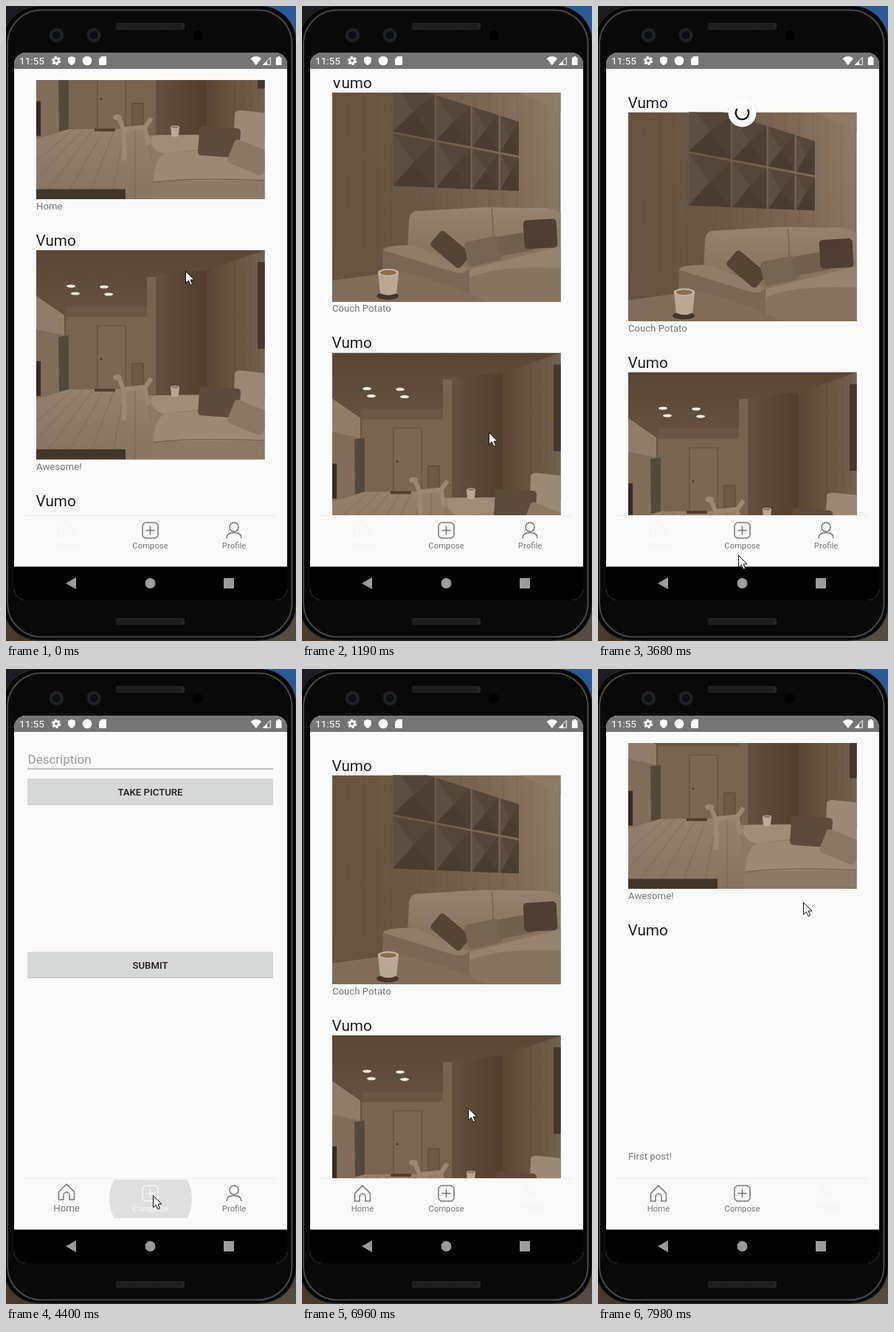
An HTML page for the animation above (8 s loop, 393 px wide and 858 px high).

```html
<!DOCTYPE html>
<html lang="en">
<head>
<meta charset="utf-8">
<title>Photo feed on a phone</title>
<style>
  html, body { margin: 0; width: 100%; height: 100%; overflow: hidden; background: #14161c; }
  svg { display: block; }
  text { font-family: Roboto, Arial, sans-serif; }
  .title { font-size: 20.7px; fill: #202020; }
  .caption { font-size: 13.2px; fill: #757575; }
  .button { font-size: 13.2px; font-weight: 500; fill: #1c1c1c; text-anchor: middle; }
  .label { text-anchor: middle; }
</style>
</head>
<body>
<svg id="stage" width="393" height="858" viewBox="0 0 393 858"></svg>
<script>
const LOOP = 8000;
const PITCH = 351.5, FIRST = 143.5, PHOTO_H = 282.5;
// Moments of the story, in ms.
const PULL = 2190, COMPOSE = 4240, PROFILE = 6040, BLANK = 6160, LOADED = 6290;

const poly = (points, fill, extra = '') => `<polygon points="${points}" fill="${fill}" ${extra}/>`;
const rect = (x, y, w, h, fill, extra = '') =>
  `<rect x="${x}" y="${y}" width="${w}" height="${h}" fill="${fill}" ${extra}/>`;
const path = (d, fill, extra = '') => `<path d="${d}" fill="${fill}" ${extra}/>`;
const line = (d, stroke, width = 1, extra = '') =>
  path(d, 'none', `stroke="${stroke}" stroke-width="${width}" ${extra}`);
const circle = (x, y, r, fill, extra = '') => `<circle cx="${x}" cy="${y}" r="${r}" fill="${fill}" ${extra}/>`;
const ellipse = (x, y, rx, ry, fill) => `<ellipse cx="${x}" cy="${y}" rx="${rx}" ry="${ry}" fill="${fill}"/>`;
const text = (x, y, cls, words, extra = '') => `<text x="${x}" y="${y}" class="${cls}" ${extra}>${words}</text>`;
const repeat = (n, make) => Array.from({ length: n }, (_, i) => make(i)).join('');
const gradient = (id, dir, ...colors) => `<linearGradient id="${id}" ${dir}>` +
  colors.map((c, i) => `<stop offset="${i / (colors.length - 1)}" stop-color="${c}"/>`).join('') + '</linearGradient>';

const pillow = (x, y, w, h, turn, fill) =>
  rect(-w / 2, -h / 2, w, h, fill, `rx="5" transform="translate(${x} ${y}) rotate(${turn})"`);
const cup = (x, y, size, coffee) => `<g transform="translate(${x} ${y}) scale(${size})">` +
  path('M-1 0H1L.8 2Q0 2.400-.8 2Z', '#b8a896') + ellipse(0, 0, 1, 0.35, '#c6b7a4') +
  ellipse(0, 0.03, 0.8, 0.24, coffee) + '</g>';

// Wall cushions in perspective: each one is a four-sided pyramid.
function wallPanels() {
  const top = x => -15 + (x - 82) * 0.318;
  const mid = x => 54 + (x - 82) * 0.19;
  const low = x => 126 + (x - 82) * 0.04;
  const edge = i => 82 + 64.5 * i - 5.3 * i * i;
  const panel = (l, r, hi, lo) => {
    const a = `${l},${hi(l)}`, b = `${r},${hi(r)}`, c = `${r},${lo(r)}`, d = `${l},${lo(l)}`;
    const m = `${(l + r) / 2},${(hi(l) + hi(r) + lo(l) + lo(r)) / 4}`;
    return poly([a, b, c, d], '#55463b') + poly([b, c, m], '#4e4036') +
      poly([c, d, m], '#4a3c33') + poly([d, a, m], '#5d4e43');
  };
  return repeat(4, i => {
    const l = edge(i), r = edge(i + 1) - 2.5;
    return panel(l, r, top, x => mid(x) - 1.5) + panel(l, r, x => mid(x) + 1.5, low);
  });
}

function couchPhoto() {
  return rect(0, 0, 310, 283, 'url(#wallA)') +
    repeat(17, i => line(`M${i * 19 + 4} 0V215`, '#4f3c2b', 0.8, 'opacity=".22"')) +
    poly('255,0 310,0 310,26', '#8d7a67') + wallPanels() +
    path('M101 240L104 172Q106 159 118 160L206 155L267 156Q300 154 310 164V240Z', 'url(#sofa)') +
    line('M216 157Q219 180 218 200', '#6b5848', 1) +
    path('M180 240L310 208V283H180Z', '#95826f') +
    path('M66 283L69 213Q70 206 112 206L186 238L187 283Z', '#7b6755') +
    path('M69 213Q70 206 112 206L186 238Q176 247 163 242Z', '#8f7c69') +
    path('M187 250Q220 234 310 237V283H187Z', '#87735f') +
    pillow(160, 212, 52, 27, 40, '#544436') + pillow(205, 214, 48, 33, -12, '#776553') +
    pillow(249, 204, 50, 26, -10, '#715f4f') + pillow(282, 191, 45, 39, -3, '#4e3e33') +
    path('M0 254L89 242Q150 253 210 283H0Z', '#806c59') +
    ellipse(75, 275, 15, 5, '#43362c') + cup(76, 243, 14, '#8f6d4b');
}

function roomPhoto() {
  return rect(0, 0, 310, 283, 'url(#ceiling)') +
    rect(40, 76, 115, 15, '#6a5644') + rect(40, 90, 115, 98, '#776451') +
    rect(83, 102, 38, 86, '#7b6754', 'stroke="#5c4938" stroke-width=".8"') +
    rect(130, 153, 15, 34, '#6d5a47', 'stroke="#544231" stroke-width=".8"') +
    circle(88, 147, 1.5, '#4a392a') +
    poly('0,201 42,188 160,187 160,283 0,283', 'url(#floor)') +
    repeat(8, i => line(`M${50 + i * 14} 188L${-58 + i * 32} 283`, '#665342', 0.7, 'opacity=".6"')) +
    // kitchen
    poly('0,62 38,88 38,190 0,201', '#7f6c59') + poly('0,62 38,88 38,115 0,107', '#907d69') +
    rect(0, 150, 6, 47, '#362c25') + poly('30,117 44,115 44,188 31,191', '#54473b') +
    rect(79, 187, 28, 4, '#51402f') + rect(0, 269, 121, 14, '#42352a') +
    // walls on the right
    rect(150, 36, 13, 160, '#77634f') + poly('162,34 231,27 231,197 162,197', 'url(#column)') +
    poly('231,27 310,0 310,200 231,197', 'url(#wallB)') +
    repeat(7, i => line(`M${236 + i * 11} ${24 - i * 3.6}V195`, '#503d2b', 0.8, 'opacity=".28"')) +
    rect(300, 16, 10, 117, '#43372e') +
    // sofa
    path('M266 240L269 166Q271 161 282 163L310 166V240Z', '#9b8976') +
    path('M155 203Q155 196 164 196L232 195L310 232V283H157Z', '#8c7966') +
    path('M155 203Q155 196 164 196H232V214L174 221Q158 218 155 203Z', '#9f8d79') +
    path('M159 258Q160 220 182 220L235 216L310 240V257Z', '#9b8975') +
    line('M158 260Q200 253 310 257', '#756250', 1.2) +
    pillow(248, 205, 56, 40, 4, '#5c4a3c') + pillow(288, 226, 52, 34, 22, '#8a7764') + cup(188, 185, 6, '#8a7663') +
    // dog
    ellipse(110, 172, 6, 4, '#9a8875') +
    line('M113 175L119 190V230M118 188L147 185L152 209M148 185L156 173', '#9a8875', 6, 'stroke-linejoin="round"') +
    repeat(4, i => ellipse(47 + 45 * (i % 2) + 6 * (i >> 1), 48.5 + 10 * (i >> 1) + i % 2, 6, 2.1, '#f6efe4'));
}

const posts = [['Couch Potato', 'couch'], ['Home', 'room'], ['Awesome!', 'room'], ['First post!', '']];
const card = ([caption, photo], i) => {
  const y = FIRST + i * PITCH;
  const picture = photo ? `<g transform="translate(41 ${y})" clip-path="url(#frame)"><use href="#${photo}"/></g>` : '';
  return text(40.5, y - 6, 'title', 'Vumo') + picture + text(41, y + 296.5, 'caption', caption);
};

const button = (y, words) => rect(29, y + 1, 333, 35, '#000', 'rx="2" opacity=".18"') +
  rect(29, y, 333, 34, '#d6d7d7', 'rx="2"') + text(195.5, y + 22.5, 'button', words);

const grille = y => rect(149, y, 93, 9, '#252525', 'rx="2"') +
  repeat(30, i => line(`M${151 + i * 3} ${y + 1}v7`, '#101010', 1));
const lens = x => circle(x, 39.5, 10, '#1b1e22') + circle(x, 39.5, 6.5, '#0c0e11', 'stroke="#30353c"');

const phone = rect(0, 0, 393, 858, '#1b1d22') + rect(340, 0, 53, 60, '#2c5a94') +
  rect(0, 800, 60, 58, '#4a3a2c') + rect(340, 800, 53, 58, '#544b41') +
  rect(-4, 0, 397, 857, '#050505', 'rx="48" stroke="#2c2c2c"') +
  rect(2, 5.5, 385.5, 847, '#090909', 'rx="46" stroke="#484848" stroke-width="2"') +
  grille(23) + grille(827) + lens(68.5) + lens(119) + circle(260, 40, 7, '#000');

const statusIcons = text(18, 79, '', '11:55', 'font-size="13.6" fill="#fff"') +
  circle(68, 74, 3.4, 'none', 'stroke="#fff" stroke-width="2.8"') +
  circle(68, 74, 5.3, 'none', 'stroke="#fff" stroke-width="2" stroke-dasharray="2.8 2.75"') +
  path('M89 68l5 2v4q-.5 4-5 6q-4.500-2-5-6v-4z', '#fff') + circle(110, 74, 6.3, '#fff') +
  path('M129.500 68h6.500v12h-10v-8.500z', '#fff') +
  path('M331.500 71Q339 65 346 71L338.800 80Z', '#fff') +
  line('M348.500 79.300L358.300 69.500V79.300Z', '#fff', 1) + poly('348,80 354,74 354,80', '#fff') +
  rect(365.8, 69.5, 7.6, 10.5, '#fff') + rect(368, 68, 3.2, 2, '#fff');

const navItems = [
  ['Home', '<path d="M-10.500 0L0-10.500L10.500 0V10.500H4V4.500A4 4 0 0 0-4 4.500V10.500H-10.500Z"/>'],
  ['Compose', '<rect x="-10.500" y="-10.500" width="21" height="21" rx="5"/><path d="M-6 0H6M0-6V6"/>'],
  ['Profile', '<circle cy="-4.500" r="6"/><path d="M-10 10.500Q-10 3 0 3Q10 3 10 10.500"/>']
];
const tabX = i => 82 + 113.5 * i;

document.getElementById('stage').innerHTML = `<defs>
  ${gradient('wallA', 'x2="1" y2="-.15"', '#66523f', '#6d5947', '#7b6754', '#927e6a')}
  ${gradient('wallB', 'x2="1"', '#5a4735', '#685441', '#75614e')}
  ${gradient('column', 'x2="1"', '#65513f', '#594636', '#533f2e')}
  ${gradient('ceiling', 'x2="0" y2="1"', '#594636', '#6b5745', '#7b6856')}
  ${gradient('sofa', 'x2="0" y2="1"', '#96836f', '#826e5b')}
  ${gradient('floor', 'x2="0" y2="1"', '#94816d', '#867360')}
  <clipPath id="screen"><rect x="11" y="63" width="370" height="740" rx="16"/></clipPath>
  <clipPath id="view"><rect x="11" y="100" width="370" height="589"/></clipPath>
  <clipPath id="frame"><rect width="309.500" height="${PHOTO_H}"/></clipPath>
  <clipPath id="tabs"><rect x="27" y="690" width="339" height="52"/></clipPath>
  <g id="couch">${couchPhoto()}</g><g id="room">${roomPhoto()}</g></defs>
  ${phone}
  <g clip-path="url(#screen)">
    ${rect(11, 63, 370, 740, '#fafafa') + rect(11, 63, 370, 22, '#757575') + statusIcons}
    <g clip-path="url(#view)"><g id="list">${posts.map(card).join('')}</g>
      <g id="spinner">${circle(0, 1, 20, '#000', 'opacity=".09"') + circle(0, 0, 19, '#fdfdfd')}
        <circle id="arc" r="8.700" fill="none" stroke="#111" stroke-width="2.300" pathLength="100"/></g></g>
    <g id="form">${text(29.5, 128, '', 'Description', 'font-size="17" fill="#9b9b9b"') +
      line('M29 135H362', '#868686', 1) + button(148, 'TAKE PICTURE') + button(382, 'SUBMIT')}</g>
    ${line('M27 688.500H366', '#ededed', 1)}
    <g clip-path="url(#tabs)"><circle id="ripple" cy="716" fill="#dfdfdf"/></g>
    ${navItems.map(([name, icon], i) =>
      `<g class="tab"><g fill="none" stroke-width="1.500" stroke-linejoin="round">${icon}</g>` +
      text(tabX(i), 733, 'label', name) + '</g>').join('')}
    ${rect(11, 757.5, 370, 46, '#000') + poly('81,780 95,772 95,788', '#9c9c9c') +
      circle(195.5, 780, 7, '#9c9c9c') + rect(295, 773, 14, 14, '#9c9c9c')}
  </g>
  <path id="cursor" d="M.5 .5V16.500L4.300 13L7 19L9.500 17.800L7 12H12Z" fill="#fff" stroke="#111"/>`;

const refresh = time => time < 150 ? 0 : 150 + Math.floor((time - 150) / 128.3) * 128.3;

// Turning points of the mouse: time, x, y.
const pointer = [[0, 243, 358], [670, 255, 385], [1310, 252, 626], [1820, 214, 359], [2090, 219, 403],
  [2460, 190, 652], [3250, 183, 767], [4060, 199, 711], [4540, 199, 711], [5030, 185, 232], [5540, 316, 712],
  [6160, 316, 712], [6540, 213, 473], [6950, 225, 593], [7465, 282, 501], [7976, 278, 315]];

function pointerAt(t) {
  const i = pointer.findIndex(k => k[0] > t);
  if (i < 0) return pointer[pointer.length - 1].slice(1);
  const [t0, x0, y0] = pointer[i - 1], [t1, x1, y1] = pointer[i];
  const f = (t - t0) / (t1 - t0);
  return [x0 + (x1 - x0) * f, y0 + (y1 - y0) * f];
}

const progress = (t, from, to) => Math.min(1, Math.max(0, (t - from) / (to - from)));
const fling = (f, power) => 1 - (1 - f) ** power;
const scrollAt = t => t < COMPOSE
  ? 516.5 * (1 - fling(progress(t, 0, 1310), 1.3))
  : 832 * fling(progress(t, 6950, 7976), 2.32);

const $ = id => document.getElementById(id);
const tabs = [...document.querySelectorAll('.tab')];
const show = (el, on) => el.setAttribute('display', on ? 'inline' : 'none');
const move = (el, x, y) => el.setAttribute('transform', `translate(${x} ${y})`);

function drawTabs(t) {
  const chosen = t < COMPOSE ? 0 : t < PROFILE ? 1 : 2;
  const since = t - (chosen === 2 ? PROFILE : COMPOSE);
  const rippling = chosen > 0 && since < 240;
  show($('ripple'), rippling);
  if (rippling) {
    $('ripple').setAttribute('cx', tabX(chosen) + 0.5);
    $('ripple').setAttribute('r', 56 * progress(since, -120, 120));
  }
  tabs.forEach((tab, i) => {
    const big = i === (rippling ? chosen - 1 : chosen);
    const color = i !== chosen ? '#757575' : rippling ? '#f8f8f8' : '#f5f5f5';
    const [icon, label] = tab.children;
    move(icon, tabX(i), big ? 706.5 : 708.5);
    icon.setAttribute('stroke', color);
    label.setAttribute('fill', color);
    label.setAttribute('font-size', big ? 13.2 : 11.3);
  });
}

function drawSpinner(t) {
  const loading = t >= PULL && t < COMPOSE;
  show($('spinner'), loading);
  if (!loading) return;
  const age = t - PULL - 270;
  const sweep = 50 + 30 * Math.cos(age / 1333 * 2 * Math.PI);
  move($('spinner'), 195.5, 144.5 + 33 * Math.sin(Math.PI * progress(age, -300, 0)));
  $('arc').setAttribute('stroke-dasharray', `${sweep} ${100 - sweep}`);
  $('arc').setAttribute('transform', `rotate(${225 + age * 0.4})`);
}

function draw(now) {
  const t = refresh(now % LOOP);
  move($('list'), 0, -scrollAt(t));
  show($('list'), t < COMPOSE || t >= LOADED);
  show($('form'), t >= COMPOSE && t < BLANK);
  drawSpinner(t);
  drawTabs(t);
  move($('cursor'), ...pointerAt(t).map(Math.round));
}

const start = performance.now();
function tick() {
  draw(performance.now() - start);
  requestAnimationFrame(tick);
}
tick();
</script>
</body>
</html>
```
